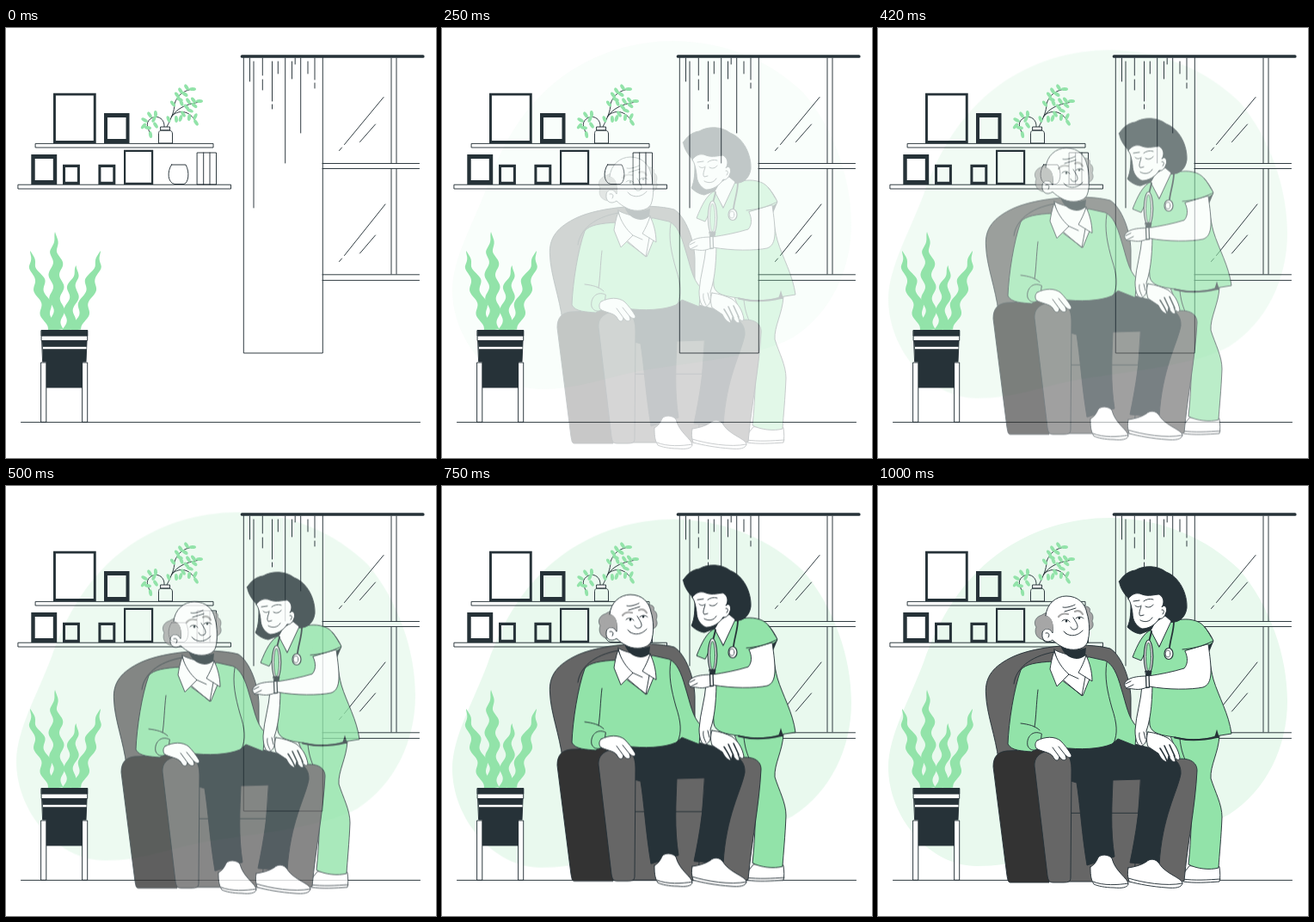
Recreate the animation shown at these times as an HTML page with a canvas. Size 500 by 500 pixels, loop 1.04 s.

```html
<!DOCTYPE html>
<html lang="en">
<head>
<meta charset="utf-8">
<title>Home care</title>
<style>
html, body { margin: 0; width: 100%; height: 100%; overflow: hidden; background: #fff; }
canvas { display: block; width: 100vw; height: 100vh; }
</style>
</head>
<body>
<canvas id="stage"></canvas>
<script>
const SIZE = 500, LOOP = 1040, FPS = 24;
const INK = '#263238', GREEN = '#92e3a9', WHITE = '#fff', GREY = '#666', DARK = '#333', HAIR = '#a6a6a6';
const ratio = window.devicePixelRatio || 1;
let pen;

function prepare(canvas) {
  canvas.width = canvas.height = SIZE * ratio;
  const ctx = canvas.getContext('2d');
  ctx.scale(ratio, ratio);
  ctx.lineCap = ctx.lineJoin = 'round';
  return ctx;
}

function layer(draw) {
  const canvas = document.createElement('canvas');
  pen = prepare(canvas);
  draw();
  return canvas;
}

function shape(d, fill, stroke = INK, width = 0.95) {
  const path = new Path2D(d);
  if (fill) { pen.fillStyle = fill; pen.fill(path); }
  if (stroke) { pen.strokeStyle = stroke; pen.lineWidth = width; pen.stroke(path); }
}

const line = (d, width, color) => shape(d, null, color, width);
const box = (l, t, r, b, fill, stroke) => shape(`M${l} ${t}H${r}V${b}H${l}Z`, fill, stroke);

function oval(x, y, rx, ry, fill, stroke, width = 0.9, turn = 0) {
  pen.beginPath();
  pen.ellipse(x, y, rx, ry, turn, 0, Math.PI * 2);
  if (fill) { pen.fillStyle = fill; pen.fill(); }
  if (stroke) { pen.strokeStyle = stroke; pen.lineWidth = width; pen.stroke(); }
}

// Picture frame: outer box, side border, top and bottom border
function frame(l, t, r, b, side, edge = side) {
  const path = new Path2D();
  path.rect(l, t, r - l, b - t);
  path.rect(l + side, t + edge, r - l - 2 * side, b - t - 2 * edge);
  pen.fillStyle = INK;
  pen.fill(path, 'evenodd');
}

function drawWindow() {
  for (const x of [448, 454]) line(`M${x} 35V157.5M${x} 163.5V286`);
  for (const y of [157.5, 163.5, 286.8, 293.4]) line(`M368 ${y}H480.5`);
  line('M439 80.5L393.5 135.5M390.5 139L387.5 142.5M429.5 112L411.5 132.5');
  line('M441 205L393.5 264.5M390.5 268L387.5 271.5M429.5 241L411.5 262');
  box(276.7, 33, 368.3, 378);
  const folds = [[283.5, 35, 62], [288, 39, 209], [298.3, 35, 55], [298.3, 60, 72], [309.5, 39, 85],
    [309.5, 89, 94], [316.3, 39, 53], [324.7, 35, 157], [332.5, 39, 59], [336.2, 35, 42],
    [342.7, 35, 122], [351, 39, 53], [359, 35, 60], [359, 64, 70]];
  for (const [x, a, b] of folds) line(`M${x} ${a}V${b}`);
  line('M274.5 33H484.8', 3.7);
}

function drawSprig() {
  line('M187 115C192 105 196 97 196 88C199 79 205 73 217 71M192 104C199 92 212 88 226 86');
  line('M193 102C203 93 216 98 221 110M184 115C185 103 171 99 165 109C163 114 166 118 168 124');
  const leaves = [[217, 71, 0], [210, 69, 1], [203, 73, 1], [208, 77, .6], [199, 78, .9], [202, 83, .4],
    [194, 88, .9], [225, 85, 0], [218, 84, .9], [212, 85, 1], [219, 90, .7], [210, 92, .9], [204, 87, 1.2],
    [221, 110, 1], [220, 103, 2], [214, 96, .4], [213, 104, 1.7], [206, 100, 1], [203, 105, 1.9],
    [198, 106, 1.5], [189, 106, 1.2], [174, 100, 1.5], [167, 101, 1], [161, 107, .5], [160, 114, 2.3],
    [172, 106, 2], [165, 116, .2], [174, 113, 1], [168, 124, 1.4]];
  for (const [x, y, turn] of leaves) oval(x, y, 4, 2, GREEN, null, 0, turn);
  box(180, 115, 190.5, 119, WHITE);
  shape('M181 119C178 119 177.5 121 177.5 123V134H193.5V123C193.5 121 192.5 119 190 119Z');
}

function drawShelves() {
  box(34.5, 134.4, 241, 139);
  box(14.3, 182.2, 261.5, 187);
  frame(55, 75.7, 104.7, 134, 2.9);
  frame(114, 99, 143.5, 134, 4, 5);
  frame(29.3, 147, 59.2, 182, 4.4, 5);
  frame(66, 158.7, 85.9, 182, 3, 3.2);
  frame(107.4, 158.7, 127.3, 182, 3, 3.2);
  frame(137, 141.8, 171.2, 182, 2.2);
  shape('M192.5 159H209C214 168 212 180 207 181.5H196C188 180 187 167 192.5 159Z');
  box(222.5, 145, 244.5, 182);
  line('M229.7 145V182M237 145V182');
  drawSprig();
}

function wavyLeaf(tipX, tipY, baseX, width, phase) {
  const steps = 60, height = 352 - tipY;
  pen.beginPath();
  for (let i = 0; i <= 2 * steps; i++) {
    const side = i <= steps ? -1 : 1;
    const k = (i <= steps ? i : 2 * steps - i) / steps;
    const y = tipY + k * height;
    const sway = Math.sin((y - tipY) / 4.4 + phase) * 2.6 * Math.min(1, k * 5);
    const half = width / 2 * Math.min(1, Math.pow(k * 2.8, 0.8));
    pen.lineTo(tipX + (baseX - tipX) * k + sway + side * half, y);
  }
  pen.fillStyle = GREEN;
  pen.fill();
}

function drawPlant() {
  wavyLeaf(28, 259, 53, 11.5, 0.3);
  wavyLeaf(57, 237, 60, 12.5, 5.9);
  wavyLeaf(81.5, 276, 72, 10.5, 5.6);
  wavyLeaf(110, 259, 83, 11.5, 3.5);
  box(41.5, 351.5, 94.7, 363.5, WHITE);
  box(41.5, 351.5, 94.7, 358, INK);
  shape('M42 364H94L93 388H89V418H47V388H43Z', INK);
  box(43, 370.7, 93.5, 373.2, WHITE, null);
  box(41, 389, 46.8, 458.3, WHITE);
  box(89, 389, 94.7, 458.3, WHITE);
}

function drawRoom() {
  drawWindow();
  drawShelves();
  drawPlant();
  line('M17.5 458.4H481.5');
}

function drawBlob() {
  shape('M270 37C332 38 382 61 420 97C456 139 476 198 476 250C476 303 452 354 408 382C368 404 290 411 235 420' +
    'C190 428 160 442 115 442C60 442 12 385 12 327C12 290 37 248 53 205C71 153 98 110 138 80C178 50 225 37 270 37Z',
    '#e9f9ee', null);
}

function drawNurseBody() {
  shape('M362 442C354 451 352 456 355 460C367 462 384 461 397 460C398 456 398 450 397 443Z', WHITE);
  line('M354 457C368 459 384 458 398 457');
  shape('M340 290L397 290C396 310 386 325 387 340C392 356 400 370 400 385C399 410 397 428 396 444' +
    'C386 447 370 445 361 440C364 410 366 380 362 345Z', GREEN);
  line('M351 294C352 304 354 311 357 318');
  shape('M318 167C308 171 302 184 296 199L306 203L312 191C318 215 314 250 316 278C318 288 330 290 345 292' +
    'C365 297 385 294 392 291L411 288C408 265 396 245 390 225C386 210 385 195 383 188L390 181' +
    'C384 169 379 160 370 157C358 153 350 156 340 157L327 187Z', GREEN);
  line('M345 292.5C362 297 381 295 394 292', 2);
  shape('M394 283L391 293H397Z', INK, null);
  shape('M383 186L390 181L385 193Z', INK, null);
}

function drawNurseHead() {
  shape('M280.5 111C285 104 291 99 299 98C309 92 325 92 335 100C351 106 360 126 359 142C357 155 348 160 336 158' +
    'L318 167L305 172C298 171 293 167 290 164C294 156 294 145 294 134C288 127 282 121 280.5 111Z', INK);
  shape('M322 159L317 168L327 187L341 157L334 151Z', WHITE);
  shape('M291 131C295 126 300 123 307 126C315 129 322 126 327 126C333 130 333 136 330 141C333 137 337 141 335 147' +
    'C333 153 330 155 327 154C323 161 315 166 307 166C300 163 296 156 296 148C295 141 294 135 291 131Z', WHITE);
  line('M299 139C301 141 304 141 306 139M311 140C314 142 318 141 320 138M297 134L304 133M309 134C313 131 317 131 320 132');
  line('M306 140C304 146 303 149 305 151L309 150M305 156C310 159 316 158 319 153M330 144C333 143 333 147 331 149');
}

function drawStethoscope() {
  line('M318 169C317 174 316 177 315 181M344 158C344 168 340 178 339 188', 1.8);
  oval(314.5, 198.5, 5.2, 19.5, WHITE, INK, 1.2);
  oval(314.5, 198.5, 3, 16.5, GREEN, INK, 0.8);
  shape('M311 215H318L317 220H312Z', INK);
  oval(338, 195, 5, 6.5, WHITE, INK, 1.2);
  oval(337, 195, 2.8, 4, WHITE, INK, 0.7);
}

function drawNurseArms() {
  shape('M307 232C306 250 300 266 299 284C299 296 302 303 307 302C313 299 313 292 312 285C318 268 319 245 319 226Z', WHITE);
  line('M304 287C303 292 305 296 307 300M309 286L311 294');
  shape('M357 192C361 200 360 208 356 212C343 216 328 219 314 221C304 221 296 222 291 225C286 228 285 232 290 236' +
    'C296 234 301 240 315 233C337 237 364 237 378 234C390 230 388 212 384 184Z', WHITE);
  shape('M354 190C365 189 376 187 390 180L378 164L358 176Z', GREEN, null);
  line('M354 190C365 189 376 187 390 180C387 173 383 168 379 163');
  line('M289 235L297 231M288 230L294 227');
  shape('M311.5 220.5L315 220L315.5 234L312 234.5Z', WHITE, INK, 1.3);
}

function drawChair() {
  shape('M140 318C137 292 126 264 125.5 242C124 222 134 209 158 198C185 186 240 181 270 189C283 197 295 226 294 252V320Z', GREY);
  line('M158 230C160 213 176 198 205 193');
  box(222, 320, 345, 460, GREY);
  line('M225 380.3H302');
  shape('M306 335L345 318C360 315 371 320 371 331C369 372 360 415 356 459C350 462 330 461 298 460Z', GREY);
}

function drawChairArm() {
  shape('M134 326C134 314 140 309 150 308L207 306L199 461H154C151 461 151 458 150 453Z', DARK);
  shape('M182 326C181 314 190 308 205 307C219 306 225 314 225 330L224 455C224 460 222 461 215 461H204' +
    'C199 461 198 459 197 453Z', GREY);
}

function drawLegs() {
  shape('M216 304L275 294L318 305C344 312 353 322 352 335C348 356 330 385 327 441L293 438C300 405 305 370 306 341' +
    'L273 342C272 370 270 400 275 431L243 441C237 405 235 370 231 345L224 343Z', INK);
  shape('M247 443C251 441 254 437 256 432C259 428 268 428 272 433C276 449 291 456 291 463C290 467 283 468 274 467' +
    'C264 467 255 465 251 463C247 457 247 450 247 443Z', WHITE);
  line('M250 460C262 465 279 464 291 462');
  shape('M291 444C298 443 306 441 312 437C316 433 323 433 327 439C334 451 354 456 354 462C353 467 346 468 335 467' +
    'C320 466 303 463 292 460C290 454 290 449 291 444Z', WHITE);
  line('M291 456C307 461 335 466 354 462');
}

function drawManBody() {
  shape('M203 204C185 205 171 207 166 214C158 236 152 274 151 300C155 308 168 308 179 309L193 298L213 304' +
    'C235 307 258 306 272 300L279 294L299 302L301 280C291 270 289 255 283 236C278 218 273 207 264 203L246 199Z', GREEN);
  line('M266 205C263 223 267 240 272 258C278 276 279 288 274 299');
  line('M186 237C184 253 184 269 182 280M166 276C175 277 183 279 188 284');
  shape('M190 288C180 283 172 292 174 302C177 309 184 308 188 304Z', GREEN);
  shape('M185 296C195 291 205 291 212 296C217 301 221 306 225 313C225 317 221 316 218 313L219 317' +
    'C217 320 214 319 211 315C210 321 206 320 203 314C199 309 190 309 184 305C182 301 183 298 185 296Z', WHITE);
  line('M218 313L210 303M211 315L203 304');
  shape('M314 286C323 287 331 290 337 293C345 299 349 306 351 316C350 320 347 319 344 313L346 320' +
    'C344 322 341 320 338 314L336 321C332 320 329 317 326 311L314 303C312 297 312 291 314 286Z', WHITE);
  line('M328 305C331 310 334 314 336 320M333 302L339 315M339 301L345 314', 1.6);
}

function drawManHead() {
  shape('M205 190C211 195 238 201 242 196L247 222L238 244L214 226Z', WHITE);
  shape('M211 181C219 192 231 192 242 188L241 197C231 206 214 199 211 181Z', INK, null);
  shape('M205 192C202 200 201 207 200 213L208 233L222 219C214 212 208 203 205 192Z', WHITE);
  shape('M242 197C240 204 236 212 233 217L249 227C249 216 246 205 242 197Z', WHITE);
  line('M222 219L233 224M216 226L237 244L241 222');
  shape('M239 140C244 139 248 142 246 146C250 148 251 153 249 157C252 162 249 168 243 168Z', HAIR, INK, 0.5);
  shape('M202 147C194 146 192 150 188 151C182 154 181 160 184 164C181 171 185 179 195 179L206 172Z', HAIR, INK, 0.5);
  shape('M195 151C196 137 207 128 219 128C233 128 241 137 243 148C246 157 247 173 243 183C239 191 225 192 216 188' +
    'C210 185 206 182 203 179C196 184 190 179 191 172C191 166 199 163 203 171C204 160 202 153 195 151Z', WHITE);
  shape('M195 151C190 153 188 159 191 169C195 164 202 166 203 171C205 160 202 151 195 151Z', HAIR, null);
  line('M195 171C199 170 200 173 198 176M215 141C219 142 225 140 229 138M217 146C221 145 226 143 230 142');
  line('M210 152C213 148 217 148 221 149M229 146C233 144 236 146 238 149', 2.2, HAIR);
  line('M214 157C217 154 221 155 223 158M230 154C233 151 237 152 239 154');
  oval(219, 157, 1.3, 1.6, INK);
  oval(234, 153.5, 1.3, 1.6, INK);
  line('M227 153C230 158 234 163 231 166C228 168 225 167 224 164M218 171C224 176 233 174 238 168M216 169L219 172');
}

function drawPeople() {
  drawNurseBody();
  drawChair();
  drawNurseHead();
  drawStethoscope();
  drawLegs();
  drawChairArm();
  drawManBody();
  drawManHead();
  drawNurseArms();
}

// Cubic timing curve (.36, -.01, .5, 1.38), overshooting before it settles
function ease(x) {
  if (x >= 1) return 1;
  const curve = (s, a, b) => 3 * a * s * (1 - s) ** 2 + 3 * b * s * s * (1 - s) + s ** 3;
  let lo = 0, hi = 1;
  for (let i = 0; i < 30; i++) {
    const mid = (lo + hi) / 2;
    if (curve(mid, 0.36, 0.5) < x) lo = mid; else hi = mid;
  }
  return curve(lo, -0.01, 1.38);
}

const room = layer(drawRoom), blob = layer(drawBlob), people = layer(drawPeople);
const view = prepare(document.getElementById('stage'));

function render(time) {
  // Motion advances in film steps, each posed at its middle, after a short hold
  const step = Math.min(FPS, Math.floor((time % LOOP + 4) * FPS / 1000));
  const progress = step < 3 ? 0 : ease((step + 0.5) / FPS);
  const place = (art, y, alpha) => {
    view.globalAlpha = Math.min(1, alpha);
    view.drawImage(art, 0, y, SIZE, SIZE);
  };
  const shift = 30 * (1 - progress);
  view.globalAlpha = 1;
  view.fillStyle = WHITE;
  view.fillRect(0, 0, SIZE, SIZE);
  place(blob, -shift, progress);
  place(room, 0, 1);
  place(people, shift, progress);
}

const start = performance.now();
function tick() {
  render(performance.now() - start);
  requestAnimationFrame(tick);
}
tick();
</script>
</body>
</html>
```
